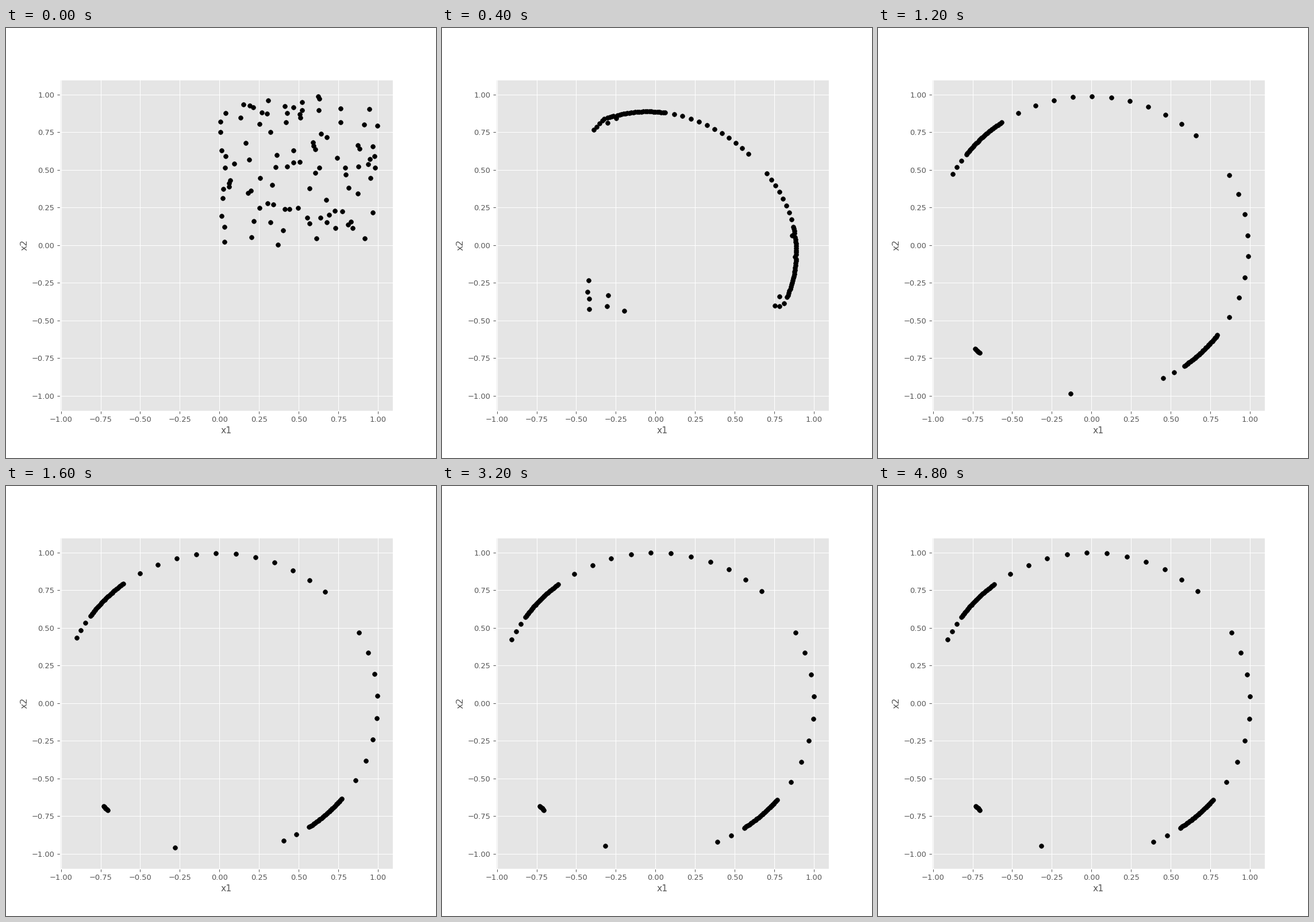
These frames come from a looping animation (748x748 px, 5000 ms). A matplotlib script:

```python
import numpy as np
import matplotlib.pyplot as plt
from matplotlib.animation import FuncAnimation

FRAMES = 50
COUNT = 100
CORNER = 7            # dots nearest the origin, pushed to the lower left
RATE = 0.4            # settling rate per step
RING = COUNT - CORNER

# The other dots, ranked from the lower right end to the upper left end,
# spread between these key angles at step 4, step 8 and at rest.
KEY_RANK = [0, 1, 3, 37, 45, 46, 57, 89, 92]
KEY_4 = [-28, -27.5, -23.5, 8, 34, 46, 86, 112, 117]
KEY_8 = [-54.6, -46.5, -45.5, -24.7, 29, 47, 112, 133, 138.6]
KEY_REST = [-108.5, -67, -56, -40, 28, 48, 128, 145, 155]


def start_points():
    """Uniform random dots: the ring in rank order, then the corner."""
    pts = np.random.default_rng(7).random((COUNT, 2))
    pts = pts[np.argsort(-pts.sum(axis=1))]
    ring, corner = pts[:RING], pts[RING:]
    turn = np.arctan2(ring[:, 1] - ring[:, 0], ring.sum(axis=1) - 0.5)
    return np.vstack([ring[np.argsort(turn)], corner[np.argsort(-corner[:, 1])]])


def spread(key, corner):
    return np.r_[np.interp(np.arange(RING), KEY_RANK, key), corner]


def radius(base, theta):
    """Radius that dips towards the 45 degree direction."""
    return base - 0.055 * np.cos(np.radians(theta - 45)) ** 4


def polar(r, deg):
    a = np.radians(deg)
    return np.column_stack([r * np.cos(a), r * np.sin(a)])


def settle(s):
    return 1 - np.exp(-RATE * s)


def mix(a, b, f):
    return a + (b - a) * f


start = start_points()
corner_4 = 0.65 * start[RING:] - 0.437
lag = 0.5 * np.clip(0.45 - np.hypot(*start.T), 0, None)

theta_4 = spread(KEY_4, np.degrees(np.arctan2(*corner_4.T[::-1])) + 360)
theta_8 = spread(KEY_8, np.linspace(223.8, 225.9, CORNER))
theta_rest = spread(KEY_REST, np.linspace(223.1, 225.3, CORNER))

r_4 = radius(0.9, theta_4) - lag
r_8 = radius(0.968, theta_8)
r_4[RING:] = np.hypot(*corner_4.T)
r_8[RING:] = 1.03


def positions(t):
    if t <= 4:
        return mix(start, polar(r_4, theta_4), t / 4)
    if t <= 8:
        f = settle(t - 4) / settle(4)
        return polar(mix(r_4, r_8, f), mix(theta_4, theta_8, f))
    f = settle(t - 8)
    return polar(mix(r_8, 1, f), mix(theta_8, theta_rest, f))


plt.style.use("ggplot")
plt.rcParams["font.family"] = "DejaVu Sans"
fig, ax = plt.subplots(figsize=(8, 8), dpi=93.5, facecolor="white")
fig.subplots_adjust(left=0.125, right=0.9, bottom=0.11, top=0.88)
ticks = np.linspace(-1, 1, 9)
ax.set(xlim=(-1.0075, 1.0945), ylim=(-1.1, 1.1), xticks=ticks, yticks=ticks,
       xlabel="x1", ylabel="x2")
dots = ax.scatter(*start.T, c="black", zorder=3)


def update(i):
    dots.set_offsets(positions(i))
    return dots,


anim = FuncAnimation(fig, update, frames=FRAMES, interval=100, repeat=True,
                     repeat_delay=0)
plt.show()
```
